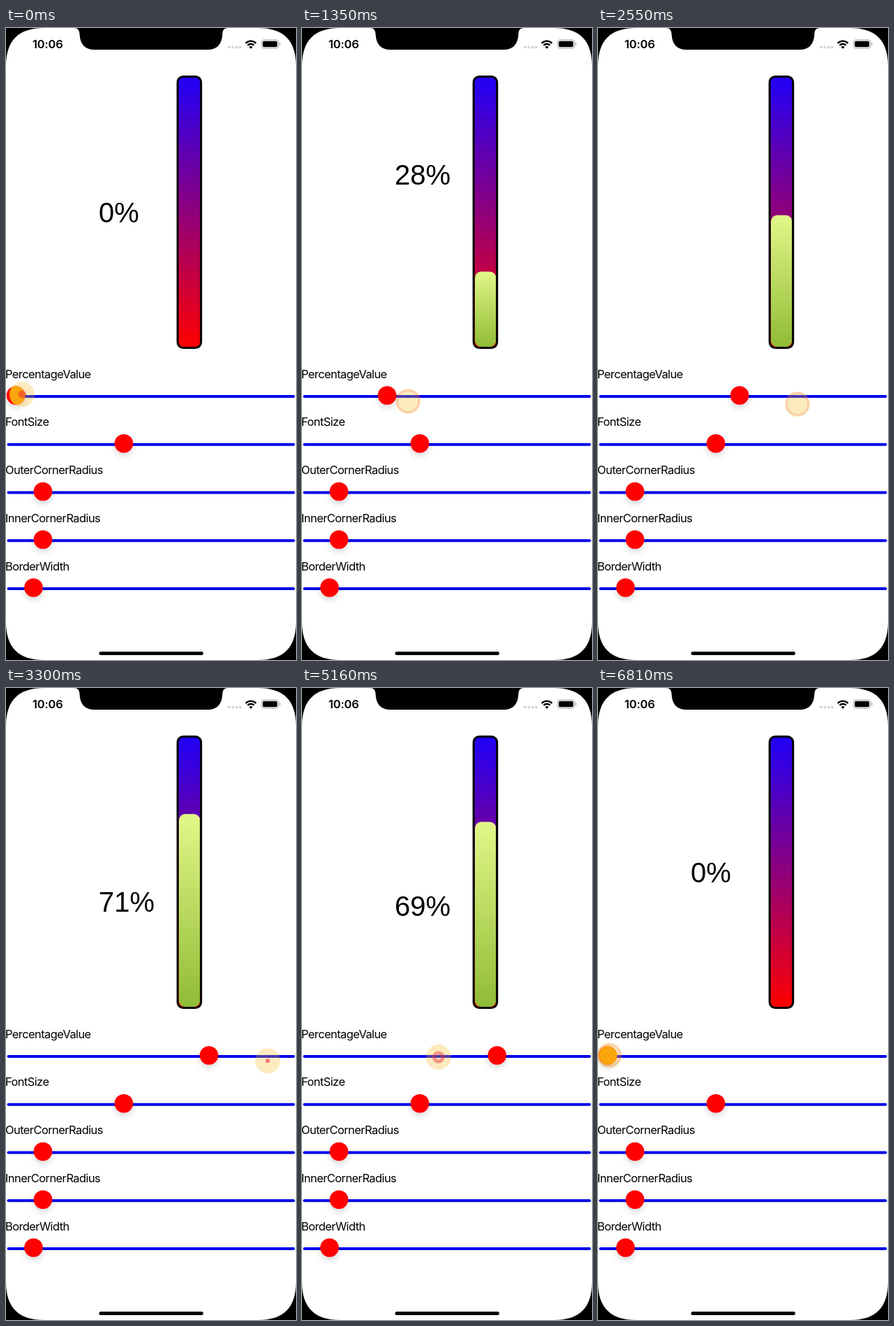
An HTML page for the animation above (6.84 s loop, 416 px wide and 904 px high).

```html
<!DOCTYPE html>
<html lang="en">
<head>
<meta charset="utf-8">
<title>Percentage bar</title>
<style>
  html, body { margin: 0; width: 100%; height: 100%; overflow: hidden; background: #000; }
  svg { display: block; width: 416px; height: 904px; }
  .label { font: 16.5px Inter, sans-serif; letter-spacing: -.6px; }
  .clock { font: 600 16.5px Inter, sans-serif; letter-spacing: -.2px; }
  .value { font: 40px "Liberation Sans", Arial, sans-serif; }
</style>
</head>
<body>
<svg viewBox="0 0 416 904">
  <defs>
    <linearGradient id="bar" x2="0" y2="1">
      <stop stop-color="#2000f8"/><stop offset="1" stop-color="#f00"/>
    </linearGradient>
    <linearGradient id="level" x2="0" y2="1">
      <stop stop-color="#e2f788"/><stop offset="1" stop-color="#90bc36"/>
    </linearGradient>
    <filter id="shadow" x="-50%" y="-50%" width="200%" height="200%">
      <feDropShadow dx="0" dy="4" stdDeviation="4" flood-opacity=".16"/>
    </filter>
    <clipPath id="touchClip"><circle id="clipDisc" r="18"/></clipPath>
  </defs>

  <path fill="#fff" d="M0 54C0 18 18 0 54 0H362C398 0 416 18 416 54V850C416 886 398 904 362 904H54C18 904 0 886 0 850Z"/>
  <path d="M98 0C103 0 105 3 105.500 8C106 23 113 31 127 31H289C303 31 310 23 310.500 8C311 3 313 0 318 0Z"/>
  <text class="clock" x="38" y="29">10:06</text>
  <g fill="#d4d4d4">
    <circle cx="320" cy="27.500" r="2"/><circle cx="325.500" cy="27.500" r="2"/>
    <circle cx="331" cy="27.500" r="2"/><circle cx="336" cy="27.500" r="2"/>
  </g>
  <g fill="none" stroke="#000" stroke-width="2.400">
    <path d="M343.800 21.800a10.300 10.300 0 0 1 14.800 0M346.600 24.800a6.300 6.300 0 0 1 9.200 0"/>
  </g>
  <path d="M348.700 27.200a3.600 3.600 0 0 1 5 0l-2.500 2.600z"/>
  <rect x="366.500" y="17" width="24.500" height="12" rx="3.500" fill="none" stroke="#a5a5a5"/>
  <rect x="368.200" y="18.700" width="21" height="8.600" rx="2"/>
  <path d="M392.300 21v4q1.500-.5 1.500-2t-1.500-2" fill="#a5a5a5"/>
  <rect x="133.500" y="892" width="149.500" height="5" rx="2.500"/>

  <rect x="246.200" y="69.500" width="33.600" height="388" rx="8" fill="url(#bar)"/>
  <rect id="fill" x="248" width="30.500" rx="9" fill="url(#level)"/>
  <rect x="246.200" y="69.500" width="33.600" height="388" rx="8" fill="none" stroke="#000" stroke-width="3"/>
  <text id="value" class="value" x="133"></text>

  <g id="sliders"></g>

  <g id="touch">
    <circle r="18" fill="#f0be28" fill-opacity=".3"/>
    <circle id="ring" fill="none" stroke="#f02840"/>
  </g>
  <g clip-path="url(#touchClip)"><circle id="hotKnob" cy="525.500" r="13.300" fill="#ff9a00"/></g>
</svg>

<script>
const LOOP = 6840;
const KNOB_MIN = 14, KNOB_STEP = 3.88;
const PULSE = 302;
const $ = id => document.getElementById(id);

// Keyframes: [time, x] and [time, x, y]
const knobPath = [[0, 14], [250, 14], [1350, 122], [2550, 203], [4050, 379],
  [4220, 398], [4400, 398], [4700, 353], [5160, 280], [6060, 133], [6740, 14], [LOOP, 14]];
const touchPath = [[0, 23, 524], [1350, 152, 534], [2550, 286, 538], [2760, 310, 537],
  [3480, 397, 532], [3660, 397, 530], [4050, 346, 528], [5160, 196, 528],
  [6060, 68, 526], [6440, 16, 525.5], [6810, 16, 525.5], [LOOP, 23, 524]];

const sliders = [
  ["PercentageValue", 14], ["FontSize", 169], ["OuterCornerRadius", 53],
  ["InnerCornerRadius", 53], ["BorderWidth", 39.5]
];
$("sliders").innerHTML = sliders.map(([name, x], i) => {
  const y = 527 + i * 68.75;
  return `<text class="label" x="-1" y="${y - 26.5}">${name}</text>
    <path d="M3.500 ${y}H412.500" stroke="#0000ea" stroke-width="4" stroke-linecap="round"/>
    <circle class="knob" cx="${x}" cy="${y - 1.5}" r="13.300" fill="#f00" filter="url(#shadow)"/>`;
}).join("");
const knob = document.querySelector(".knob");

const clamp = (v, lo, hi) => Math.max(lo, Math.min(hi, v));

function set(el, attrs) {
  for (const key in attrs) el.setAttribute(key, attrs[key]);
}

function along(path, t) {
  const i = Math.max(1, path.findIndex(k => k[0] >= t));
  const a = path[i - 1], b = path[i];
  const u = (t - a[0]) / (b[0] - a[0]);
  return a.slice(1).map((v, j) => v + (b[j + 1] - v) * u);
}

function drawBar(percent) {
  const height = percent * 3.86;
  set($("fill"), { y: 456 - height, height });
  const hidden = percent > 45 && percent < 55;
  const base = percent < 50 ? 278 : 459.5;
  $("value").textContent = hidden ? "" : Math.round(percent) + "%";
  set($("value"), { y: base - 1.95 * percent });
}

function drawTouch(t, x, y) {
  set($("touch"), { transform: `translate(${x} ${y})` });
  set($("clipDisc"), { cx: x, cy: y });
  const u = clamp((t / PULSE + .25) % 1 / .66, 0, 1);
  const outer = 17 * u * u * (3 - 2 * u);
  const hole = clamp((outer - 8) * 4, 0, Math.max(0, outer - 3));
  set($("ring"), {
    r: (outer + hole) / 2,
    "stroke-width": outer - hole,
    opacity: .75 - .6 * u
  });
}

function render(t) {
  const [x] = along(knobPath, t);
  set(knob, { cx: x });
  drawBar((x - KNOB_MIN) / KNOB_STEP);
  drawTouch(t, ...along(touchPath, t));
  set($("hotKnob"), { cx: x });
  // The pulse stays visible beside the pressed knob at the start of the drag.
  $("touch").parentNode.append($("touch"));
}

function tick() {
  render(performance.now() % LOOP);
  requestAnimationFrame(tick);
}
tick();
</script>
</body>
</html>
```
